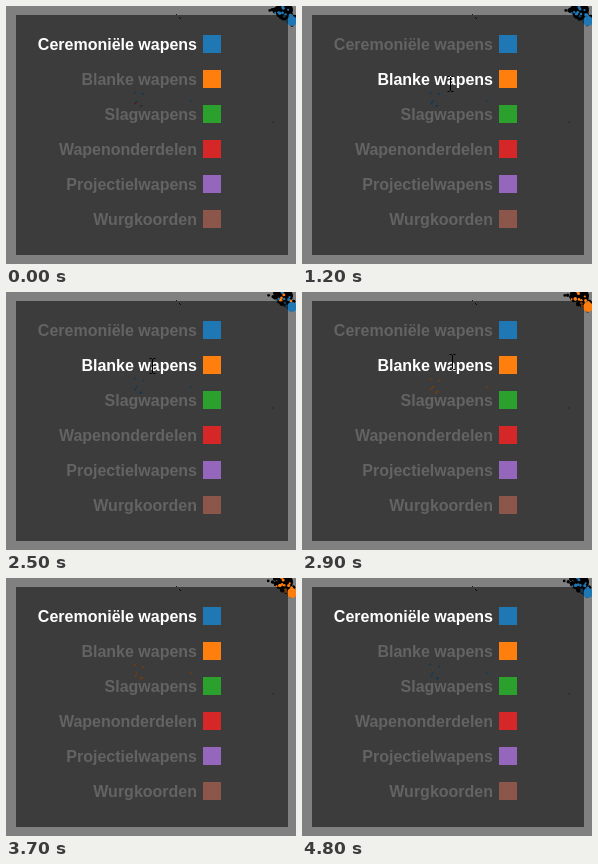
An HTML page with a canvas that plays this animation: 290 by 258 pixels, repeating every 4.9 s.

```html
<!DOCTYPE html>
<html lang="nl">
<head>
<meta charset="utf-8">
<style>
  html, body { margin: 0; width: 100%; height: 100%; overflow: hidden; background: #808080; }
  canvas, svg { position: absolute; left: 0; top: 0; }
  text { font: bold 16px "Liberation Sans", Arial, sans-serif; text-anchor: end; fill: #fff; }
</style>
</head>
<body>
<canvas id="graph" width="290" height="258"></canvas>
<svg width="290" height="258">
  <rect x="10" y="9" width="272" height="240" fill="#000" fill-opacity=".53"/>
  <g id="legend"></g>
  <path id="arrow" d="M.5 .5V16.5L4.3 13L6.8 18.8L9.2 17.8L6.8 12.2H12Z" fill="#fff" stroke="#000"/>
  <path id="beam" d="M-3 -7.5h2l1 1l1 -1h2M0 -7V7M-3 7.5h2l1 -1l1 1h2" fill="none" stroke="#000"/>
</svg>
<script>
const LOOP = 4900, STEP = 100;
const BLUE = '#1f77b4', ORANGE = '#ff7f0e';
const rows = [
  ['Ceremoniële wapens', BLUE], ['Blanke wapens', ORANGE],
  ['Slagwapens', '#2ca02c'], ['Wapenonderdelen', '#d62728'],
  ['Projectielwapens', '#9467bd'], ['Wurgkoorden', '#8c564b']
];
// Pointer path: time, x, y
const path = [
  [600, 237, 236], [700, 232, 192], [800, 214, 150], [900, 198, 112],
  [1000, 150, 76], [1700, 144, 83], [2000, 146, 72], [2100, 150, 46],
  [2200, 150, 45], [2300, 148, 70], [2500, 146, 74], [2900, 150, 70],
  [3000, 154, 52], [3300, 155, 49], [3400, 215, 204], [3500, 222, 227]
];
const $ = id => document.getElementById(id);
const ctx = $('graph').getContext('2d');

$('legend').innerHTML = rows.map(([name, color], i) =>
  `<text x="191" y="${44 + 35 * i}">${name}</text>
   <rect x="197" y="${29 + 35 * i}" width="18" height="18" fill="${color}"/>`).join('');
const labels = document.querySelectorAll('text');

function rand(n) {
  const v = Math.sin(n * 12.9898 + 4.1) * 43758.5453;
  return v - Math.floor(v);
}

function dot(x, y, r, color) {
  ctx.fillStyle = color;
  ctx.beginPath();
  ctx.arc(x, y, r, 0, 7);
  ctx.fill();
}

function pointerAt(t) {
  const i = path.findIndex(p => p[0] >= t);
  if (t < path[0][0] || i < 0) return null;
  const b = path[i], a = path[Math.max(0, i - 1)];
  const k = b === a ? 0 : (t - a[0]) / (b[0] - a[0]);
  return [1, 2].map(j => Math.round(a[j] + (b[j] - a[j]) * k));
}

function drawGraph(t) {
  const step = t / STEP;
  const colorFrom = start => t >= start && t < 4400 ? ORANGE : BLUE;
  const color = colorFrom(2800);
  ctx.clearRect(0, 0, 290, 258);

  // Node cluster: a band falling from the top edge to the right edge
  for (let i = 0; i < 48; i++) {
    const k = rand(i), off = 7 * (rand(i + 50) - .5);
    const sway = .8 * Math.sin(step * .6 + i);
    dot(266 + 24 * k + off + sway, 17 * k - off + sway, 1.2 + 1.3 * rand(i + 130), '#000');
  }
  dot(280, 4, 7, '#000');
  for (let i = 0; i < 12; i++) {
    const k = rand(i + 200), off = 8 * (rand(i + 250) - .5);
    const sway = .8 * Math.sin(step * .6 + i);
    dot(272 + 18 * k + off + sway, 3 + 13 * k - off + sway, 1 + .8 * rand(i + 300),
      colorFrom(i % 3 ? 2800 : 2400));
  }
  dot(286, 15, 5, color);

  // Stray nodes
  ctx.strokeStyle = 'rgba(0,0,0,.8)';
  ctx.beginPath();
  ctx.moveTo(170, 8);
  ctx.lineTo(171, 9);
  ctx.moveTo(173, 11);
  ctx.lineTo(175, 13);
  ctx.stroke();
  dot(267, 116, .7, 'rgba(0,0,0,.5)');
  for (let i = 0; i < 6; i++)
    dot(127 + 14 * rand(i + 400) + rand(i + step), 86 + 14 * rand(i + 430) + rand(i + step + 20),
      1, i % 3 === 1 && t < 1000 ? '#d62728' : color);
  dot(184.5, 95, .9, color);
}

function show(el, pos) {
  el.style.display = pos ? '' : 'none';
  if (pos) el.setAttribute('transform', `translate(${pos})`);
}

function frame() {
  const t = Math.floor(performance.now() % LOOP / STEP) * STEP;
  const pos = pointerAt(t);
  const overText = pos && pos[0] < 191 && pos[1] < 95;
  const active = overText && pos[1] > 56 ? 1 : 0;
  labels.forEach((el, i) => el.setAttribute('fill-opacity', i === active ? 1 : .2));
  show($('arrow'), !overText && pos);
  show($('beam'), overText && [pos[0] + .5, pos[1]]);
  drawGraph(t);
  requestAnimationFrame(frame);
}
frame();
</script>
</body>
</html>
```
